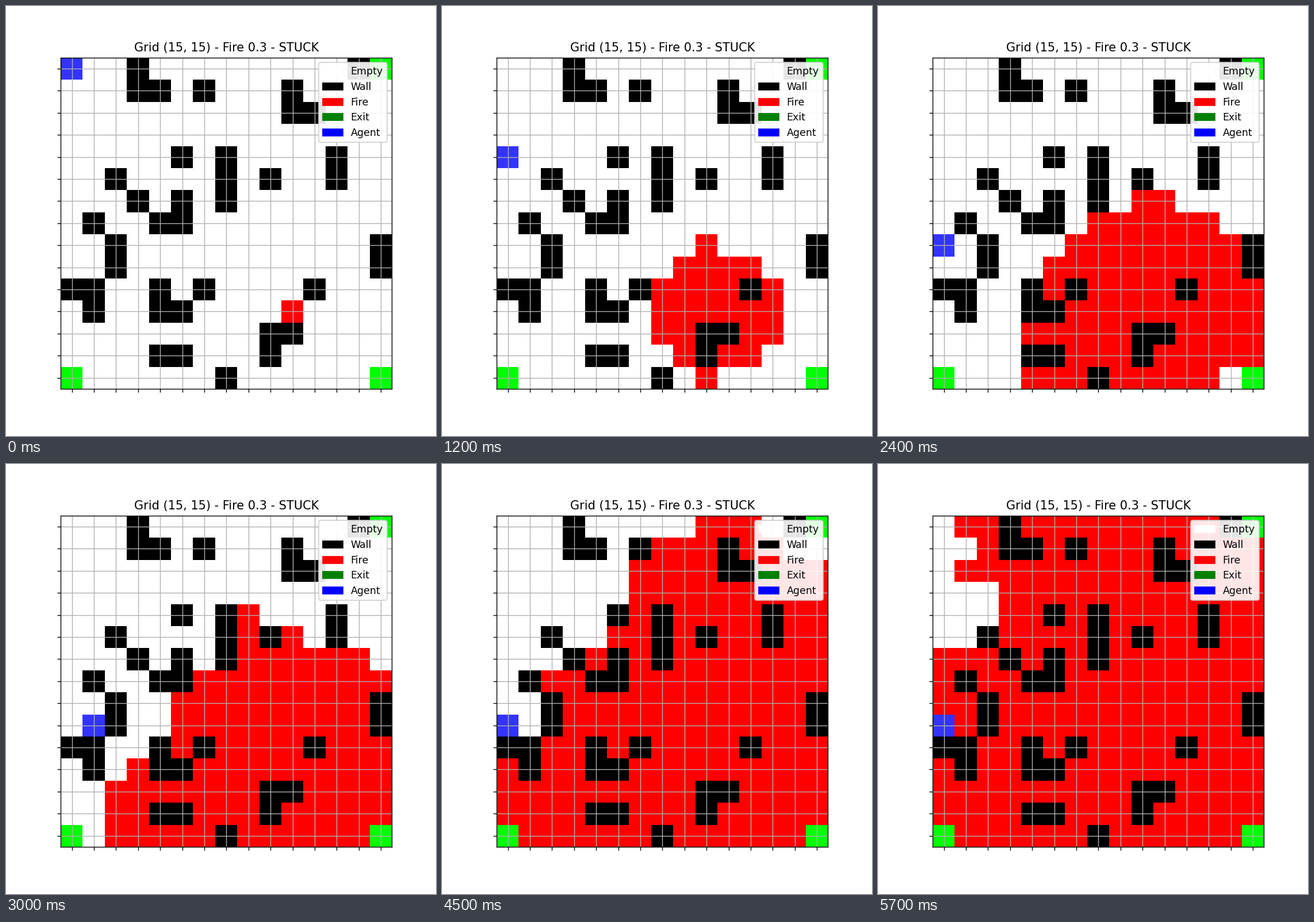
These frames come from a looping animation (748x748 px, 6300 ms). A matplotlib script:

```python
import matplotlib.pyplot as plt
import numpy as np
from matplotlib.animation import FuncAnimation
from matplotlib.patches import Patch

N = 15
LAST = 19
STEP_MS = 300
SIZE = 748
DPI = 125
RED, BLACK, LIME, BLUE = (1, 0, 0), (0, 0, 0), (0, 1, 0), (0.2, 0.2, 1)

# Level layout: wall columns in each row.
WALLS = {0: (3, 13), 1: (3, 4, 6, 10), 2: (10, 11), 4: (5, 7, 12),
         5: (2, 7, 9, 12), 6: (3, 5, 7), 7: (1, 4, 5), 8: (2, 14), 9: (2, 14),
         10: (0, 1, 4, 6, 11), 11: (1, 4, 5), 12: (9, 10), 13: (4, 5, 9), 14: (7,)}
EXITS = [(0, -1), (-1, 0), (-1, -1)]

# Key points of the spread: row, column and step at which the fire arrives.
ARRIVALS = np.array([
    (11, 10, -0.5), (10, 7, 3.4), (14, 9, 3.8), (7, 10, 5.7), (9, 6, 5.5),
    (11, 14, 5.2), (13, 6, 5.5), (14, 13, 8), (7, 14, 8.5), (4, 8, 9.6),
    (6, 11, 9.5), (12, 2, 9.6), (2, 12, 12.8), (4, 14, 12.6), (5, 6, 12.5),
    (8, 3, 12.6), (12, 0, 12.4), (1, 7, 14.8), (2, 5, 14.8), (7, 2, 14.8),
    (1, 14, 16.5), (0, 2, 18.5), (2, 1, 18.8), (5, 3, 18.5), (6, 0, 18.5),
    (9, 1, 18.5), (4, 1, 21)])


def distances(a, b):
    return np.linalg.norm(a[:, None] - b[None], axis=2)


def arrival_map():
    """Interpolate the arrival step over the grid and roughen the front."""
    points, times = ARRIVALS[:, :2], ARRIVALS[:, 2]
    n = len(points)
    system = np.ones((n + 1, n + 1))
    system[:n, :n] = distances(points, points)
    system[n, n] = 0
    weights = np.linalg.solve(system, np.append(times, 0))
    cells = np.argwhere(np.ones((N, N)))
    smooth = distances(cells, points) @ weights[:n] + weights[n]
    jitter = np.random.default_rng(4).uniform(-0.3, 0.3, (N, N))
    return smooth.reshape(N, N) + jitter


def agent_at(step):
    """Walk down the edge, then pace between two cells."""
    if step <= 9:
        return step, 0
    return 9, 1 - step % 2


def picture(step):
    img = np.ones((N, N, 3))
    img[ARRIVAL <= step] = RED
    for row, cols in WALLS.items():
        img[row, list(cols)] = BLACK
    for cell in EXITS:
        img[cell] = LIME
    img[agent_at(step)] = BLUE
    return img


ARRIVAL = arrival_map()

fig, ax = plt.subplots(figsize=(SIZE / DPI, SIZE / DPI), dpi=DPI)
image = ax.imshow(picture(0))
ax.set_title("Grid (15, 15) - Fire 0.3 - STUCK")
ax.set_xticks(range(N), labels=[])
ax.set_yticks(range(N), labels=[])
ax.grid(True)
key = [("white", "Empty"), ("black", "Wall"), ("red", "Fire"),
       ("green", "Exit"), ("blue", "Agent")]
ax.legend(handles=[Patch(color=c, label=name) for c, name in key],
          loc="upper right", framealpha=0.9)


def update(i):
    image.set_data(picture(min(i, LAST)))
    return [image]


anim = FuncAnimation(fig, update, frames=LAST + 2, interval=STEP_MS,
                     repeat=True, repeat_delay=0, blit=False)
plt.show()
```
